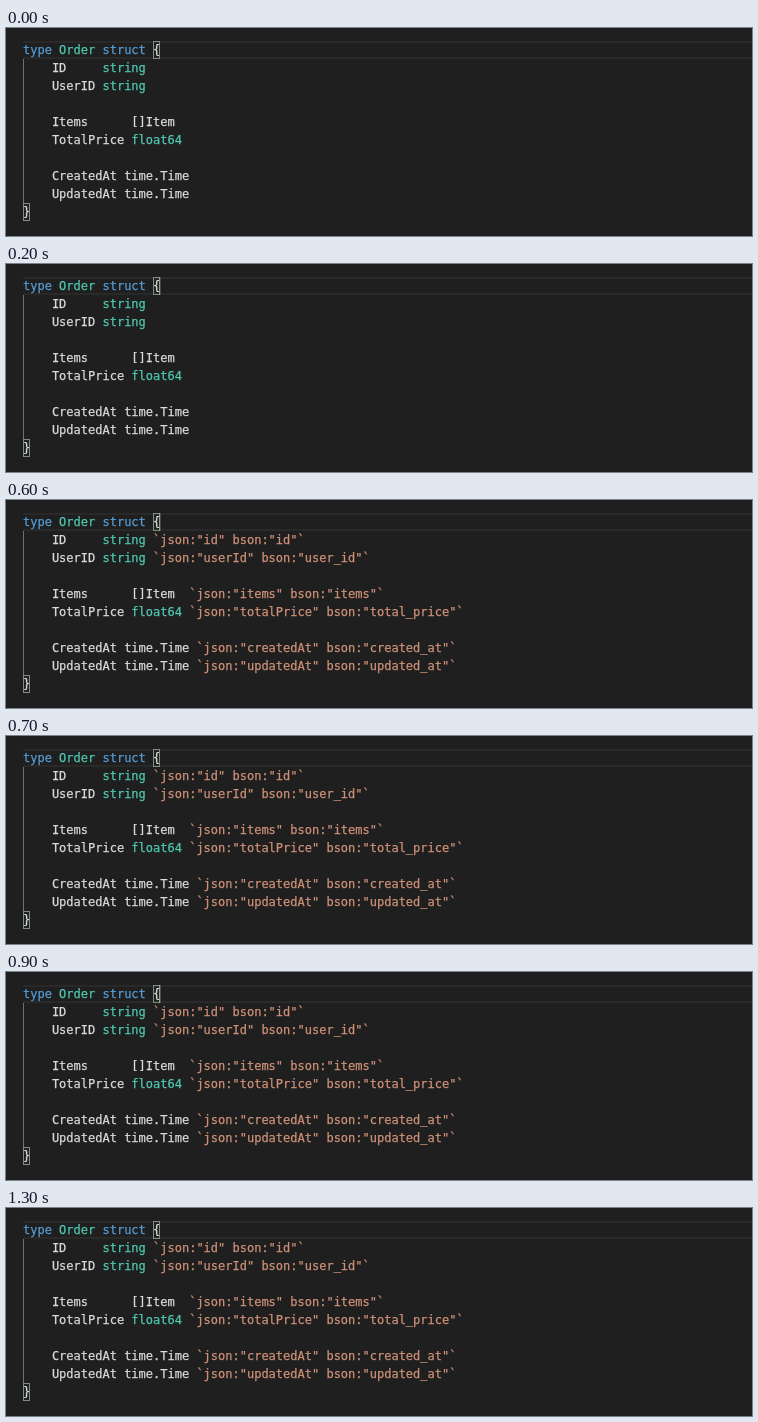
Animation, 746 px wide and 208 px high, one loop 1680 ms. Source, as an HTML page with a canvas:

```html
<!DOCTYPE html>
<html lang="en">
<head>
<meta charset="utf-8">
<title>Struct tags</title>
<style>
  html, body { margin: 0; width: 100%; height: 100%; overflow: hidden; background: #1f1f1f; }
  canvas { display: block; width: 746px; height: 208px; }
</style>
</head>
<body>
<canvas id="stage" width="746" height="208"></canvas>
<script>
const ctx = document.getElementById('stage').getContext('2d');
const LOOP = 1680, TAGS_AT = 600;
const LEFT = 17, TOP = 13, LINE = 18, CHAR = 7.224;
const COLOR = { key: '#569cd6', type: '#4ec9b0', text: '#dadada', tag: '#ce9178' };

// [row, column, colour, text]
const CODE = [
  [0, 0, 'key', 'type'], [0, 5, 'type', 'Order'], [0, 11, 'key', 'struct'], [0, 18, 'text', '{'],
  [1, 4, 'text', 'ID'], [1, 11, 'type', 'string'],
  [2, 4, 'text', 'UserID'], [2, 11, 'type', 'string'],
  [4, 4, 'text', 'Items'], [4, 15, 'text', '[]Item'],
  [5, 4, 'text', 'TotalPrice'], [5, 15, 'type', 'float64'],
  [7, 4, 'text', 'CreatedAt time.Time'],
  [8, 4, 'text', 'UpdatedAt time.Time'],
  [9, 0, 'text', '}']
];

// [row, column, json name, bson name]
const TAGS = [
  [1, 18, 'id', 'id'], [2, 18, 'userId', 'user_id'],
  [4, 23, 'items', 'items'], [5, 23, 'totalPrice', 'total_price'],
  [7, 24, 'createdAt', 'created_at'], [8, 24, 'updatedAt', 'updated_at']
];

// Caret opacity, each value held until the next time
const CARET = [[0, 0], [100, 0.04], [200, 0.2], [300, 1], [600, 0.2], [700, 0], [900, 0.25], [1000, 0.5], [1300, 0]];

function rect(x, y, w, h, color) {
  ctx.fillStyle = color;
  ctx.fillRect(x, y, w, h);
}

function write(row, col, color, text) {
  ctx.fillStyle = ctx.strokeStyle = COLOR[color];
  [...text].forEach((ch, i) => {
    const x = LEFT + (col + i) * CHAR, y = TOP + row * LINE + 13;
    ctx.fillText(ch, x, y);
    ctx.strokeText(ch, x, y);
  });
}

function bracketBox(row, col) {
  const x = Math.round(LEFT + col * CHAR), y = TOP + row * LINE;
  rect(x, y, 7, LINE, 'rgba(0,100,0,0.1)');
  ctx.strokeStyle = '#888888';
  ctx.lineWidth = 1;
  ctx.strokeRect(x + 0.5, y + 0.5, 6, LINE - 1);
}

function draw(t) {
  rect(0, 0, 746, 208, '#1f1f1f');
  rect(LEFT, TOP, 746 - LEFT, 2, '#292929');
  rect(LEFT, TOP + LINE - 2, 746 - LEFT, 2, '#292929');
  rect(LEFT, TOP + LINE, 1, 8 * LINE, '#707070');
  bracketBox(0, 18);
  bracketBox(9, 0);

  ctx.font = '12px "DejaVu Sans Mono", monospace';
  ctx.textBaseline = 'alphabetic';
  ctx.lineWidth = 0.25;
  CODE.forEach(part => write(...part));
  if (t >= TAGS_AT) {
    for (const [row, col, json, bson] of TAGS) {
      write(row, col, 'tag', '`json:"' + json + '" bson:"' + bson + '"`');
    }
  }

  ctx.globalAlpha = CARET.filter(step => step[0] <= t).pop()[1];
  rect(153, TOP, 2, LINE, '#e0e0e0');
  ctx.globalAlpha = 1;
}

const start = performance.now();
function tick() {
  draw((performance.now() - start) % LOOP);
  requestAnimationFrame(tick);
}
tick();
</script>
</body>
</html>
```
